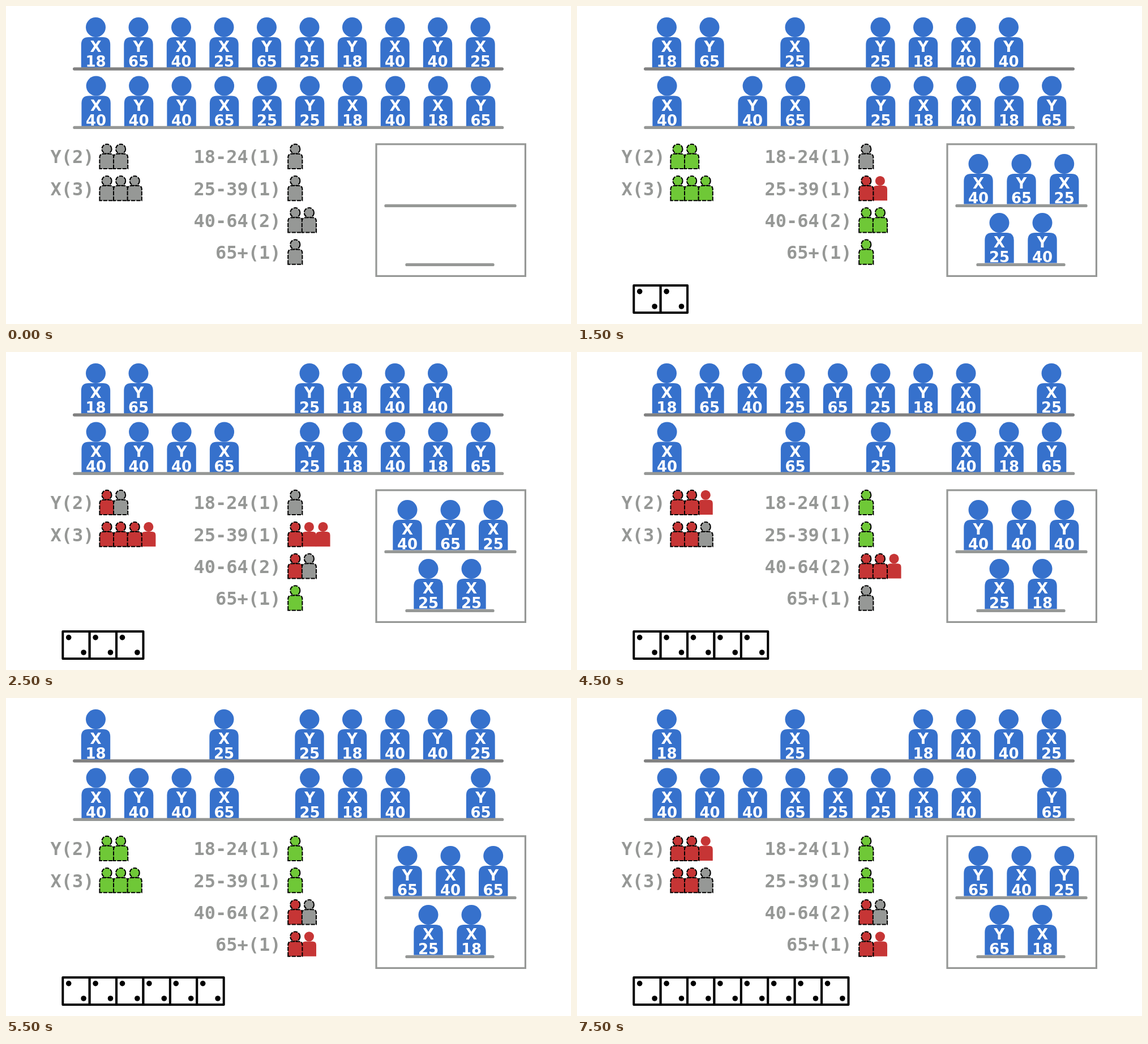
Write an HTML page that moves like this. It is 998 by 561 pixels and loops after 8000 ms.

```html
<!DOCTYPE html>
<html lang="en">
<head>
<meta charset="utf-8">
<title>Quota sampling</title>
<style>
  html, body { margin: 0; width: 100%; height: 100%; overflow: hidden; background: #fff; }
  svg { display: block; width: 998px; height: 561px; }
  .tag { font: bold 26px "DejaVu Sans", Verdana, sans-serif; fill: #fff; text-anchor: middle; }
  .quota { font: bold 32px "DejaVu Sans Mono", monospace; fill: #969896; }
  .shelf { stroke: #969896; stroke-width: 5.4; stroke-linecap: round; }
  .frame { fill: none; stroke: #969896; stroke-width: 3.2; }
  .slot { stroke: #000; stroke-width: 4.1; stroke-dasharray: 15 4; }
  .die { fill: #fff; stroke: #000; stroke-width: 4; stroke-linejoin: round; }
</style>
</head>
<body>
<svg viewBox="0 0 998 561">
  <defs>
    <g id="person">
      <circle cy="17.5" r="17.5"/>
      <path d="M-25.7 88.5V48q0-13 13-13h25.4q13 0 13 13V88.5z"/>
    </g>
    <g id="die">
      <rect class="die" width="47.4" height="48"/>
      <circle cx="10.4" cy="10.6" r="4.8"/>
      <circle cx="36.8" cy="37" r="4.8"/>
    </g>
  </defs>
  <g id="crowd"></g>
  <path class="shelf" style="stroke:#808080" d="M120.7 111H876.3"/>
  <path class="shelf" d="M121 214.4H876.6"/>
  <rect class="frame" x="654" y="243.8" width="263.4" height="232.6"/>
  <g id="sample"></g>
  <path class="shelf" d="M671 352.4H899M708 456.4H860"/>
  <g id="labels"></g>
  <g id="icons"></g>
  <g id="dice"></g>
</svg>
<script>
const BLUE = '#3671cc', GREEN = '#6fc837', RED = '#c63535', GREY = '#969896';

const people = ('X18 Y65 X40 X25 Y65 Y25 Y18 X40 Y40 X25 ' +
                'X40 Y40 Y40 X65 X25 Y25 X18 X40 X18 Y65').split(' ');

// People drawn at each step, in seat order
const draws = [
  [],
  [2, 4, 0, 14, 11],
  [2, 4, 9, 14, 11],
  [2, 4, 9, 14, 3],
  [0, 1, 7, 10, 18],
  [8, 11, 12, 14, 16],
  [1, 2, 4, 14, 18],
  [1, 2, 5, 14, 18],
  [1, 2, 5, 4, 18]
];

const seats = [[709, 261], [785, 261], [860.7, 261], [746, 365], [822, 365]];

const quotas = [
  { text: 'Y(2)', key: 'Y', need: 2, row: 0, x: 178 },
  { text: 'X(3)', key: 'X', need: 3, row: 1, x: 178 },
  { text: '18-24(1)', key: '18', need: 1, row: 0, x: 510.8 },
  { text: '25-39(1)', key: '25', need: 1, row: 1, x: 510.8 },
  { text: '40-64(2)', key: '40', need: 2, row: 2, x: 510.8 },
  { text: '65+(1)', key: '65', need: 1, row: 3, x: 510.8 }
];
const rowY = row => 243.7 + 56.2 * row;

const layer = id => document.getElementById(id);
const use = (id, attrs) => `<use href="#${id}" ${attrs}/>`;

function person(who, x, y) {
  return `<g transform="translate(${x} ${y})">${use('person', `fill="${BLUE}"`)}` +
    `<text class="tag" y="61">${who[0]}</text><text class="tag" y="87">${who.slice(1)}</text></g>`;
}

function quotaIcons({ key, need, row, x }, drawn) {
  const count = drawn.filter(who => who.includes(key)).length;
  const full = count === need ? GREEN : RED;
  let slots = '', extras = '';
  for (let i = 0; i < Math.max(need, count); i++) {
    const place = `transform="translate(${x + 24.6 * i} ${rowY(row)}) scale(.49)" ` +
      `fill="${i < count ? full : GREY}"`;
    if (i < need) slots += use('person', place + ' class="slot"');
    else extras += use('person', place);
  }
  return extras + slots;
}

function show(step) {
  const draw = draws[step], drawn = draw.map(i => people[i]);
  layer('crowd').innerHTML = people.map((who, i) => {
    const row = i > 9 ? 1 : 0;
    return draw.includes(i) ? '' : person(who, 158.5 + 75.5 * (i % 10) + 0.6 * row, 20 + 103.5 * row);
  }).join('');
  layer('sample').innerHTML = drawn.map((who, i) => person(who, ...seats[i])).join('');
  layer('icons').innerHTML = quotas.map(q => quotaIcons(q, drawn)).join('');
  layer('dice').innerHTML = Array.from({ length: step }, (_, i) =>
    use('die', `x="${100.3 + 47.4 * i}" y="493"`)).join('');
}

layer('labels').innerHTML = quotas.map(({ text, row, x }) => {
  const left = x < 300;
  return `<text class="quota" x="${left ? 78.5 : 485.5}" y="${rowY(row) + 33.6}" ` +
    `text-anchor="${left ? 'start' : 'end'}">${text}</text>`;
}).join('');

let current = -1;
function tick() {
  const step = Math.floor((performance.now() % 8000 + 500) / 1000);
  if (step !== current) show(current = step);
  requestAnimationFrame(tick);
}
tick();
</script>
</body>
</html>
```
